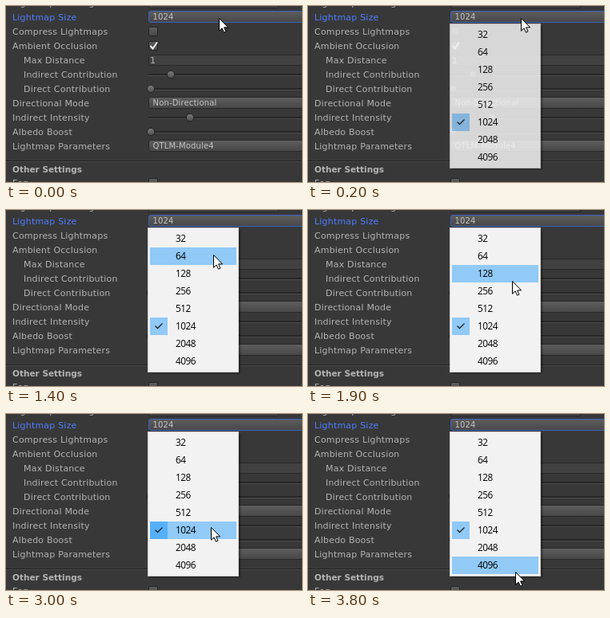
An HTML page for the animation above (4200 ms loop, 370 by 221 pixels).

```html
<!DOCTYPE html>
<html lang="en">
<head>
<meta charset="utf-8">
<title>Lightmap size menu</title>
<style>
html, body { margin: 0; width: 100%; height: 100%; overflow: hidden; background: #383838; }
svg { display: block; width: 370px; height: 221px; }
text { font: 11px "DejaVu Sans", sans-serif; white-space: pre; }
.label { fill: #b4b4b4; letter-spacing: .2px; }
.value { fill: #c4c4c4; font-size: 10px; letter-spacing: .15px; }
.focus { fill: #4c7eff; }
.title { font-size: 10.5px; font-weight: 700; letter-spacing: 0; }
.item { fill: #000; font: 11.8px "Open Sans", sans-serif; letter-spacing: -.5px; }
</style>
</head>
<body>
<svg viewBox="0 0 370 221">
  <defs>
    <linearGradient id="button" x2="0" y2="1">
      <stop stop-color="#5e5e5e"/><stop offset="1" stop-color="#474747"/>
    </linearGradient>
    <linearGradient id="knob" x2="0" y2="1">
      <stop stop-color="#7c7c7c"/><stop offset="1" stop-color="#505050"/>
    </linearGradient>
    <filter id="soft"><feGaussianBlur stdDeviation="1"/></filter>
  </defs>
  <g id="panel"></g>
  <g id="menu">
    <rect x="180" y="25" width="113" height="180" opacity=".4" filter="url(#soft)"/>
    <rect x="177.5" y="22.5" width="113" height="181" fill="#f2f2f2" stroke="#ccc"/>
    <rect id="hover" x="180" width="108" height="22" fill="#91c9f7"/>
    <rect id="tick" x="180" y="135" width="22" height="22"/>
    <path d="M186.5 145.5l3 3 6-6" fill="none" stroke="#222" stroke-width="1.3"/>
    <g id="items"></g>
  </g>
  <path id="cursor" d="M.5.5V16.3L4.1 12.9 6.5 18.2 9 17.1 6.6 11.9H11.6Z" fill="#fff" stroke="#000"/>
</svg>
<script>
const $ = id => document.getElementById(id);
const text = (x, y, s, cls) => `<text x="${x}" y="${y}" class="${cls}">${s}</text>`;

// Each control is drawn around the middle line y of its row
const popup = (y, s, edge = '#282828') =>
  `<rect x="178.5" y="${y - 7.5}" width="210" height="14" rx="2.5" fill="url(#button)" stroke="${edge}"/>`
  + text(183.5, y + 3, s, 'value');

const focused = (y, s) => popup(y, s, '#3d5fc4');

const field = (y, s, width = 210) =>
  `<rect x="178.5" y="${y - 6.5}" width="${width}" height="13" fill="#414141" stroke="#292929"/>`
  + text(180, y + 4, s, 'label');

const checkbox = (y, on) =>
  `<rect x="178.5" y="${y - 5.5}" width="11" height="11" rx="1.5" fill="url(#button)" stroke="#242424"/>`
  + (on ? `<path d="M180.5 ${y}l3 3.5 5.5-8" fill="none" stroke="#eee" stroke-width="2"/>` : '');

const slider = (y, x) =>
  `<path d="M178 ${y}h200" stroke="#272727" stroke-width="2"/>`
  + `<path d="M178 ${y + 1.5}h200" stroke="#4a4a4a"/>`
  + `<circle cx="${x}" cy="${y}" r="4.7" fill="url(#knob)" stroke="#222"/>`;

const rows = [
  ['Lightmap Size', focused, '1024'],
  ['Compress Lightmaps', checkbox, false],
  ['Ambient Occlusion', checkbox, true],
  ['  Max Distance', field, '1'],
  ['  Indirect Contribution', slider, 206],
  ['  Direct Contribution', slider, 181],
  ['Directional Mode', popup, 'Non-Directional'],
  ['Indirect Intensity', slider, 230],
  ['Albedo Boost', slider, 181],
  ['Lightmap Parameters', popup, 'QTLM-Module4']
];

$('panel').innerHTML = text(8, 0, 'Lightmap Padding', 'label') + field(-4, '', 162)
  + rows.map(([name, control, value], i) => {
    const y = 14 + i * 18;
    const x = name.startsWith(' ') ? 22 : 8;
    return text(x, y + 4, name.trim(), control === focused ? 'label focus' : 'label') + control(y, value);
  }).join('')
  + '<path d="M0 194.5h370" stroke="#252525"/><path d="M0 195.5h370" stroke="#484848"/>'
  + text(8, 209, 'Other Settings', 'label title')
  + text(8, 226, 'Fog', 'label') + checkbox(222, false);

$('items').innerHTML = Array.from({ length: 8 }, (_, i) =>
  text(212, 40 + i * 22, 32 << i, 'item')).join('');

// Pointer moves: first and last tick (100 ms each), then where it comes to rest
const moves = [
  [3, 6, 256, 35], [9, 10, 266, 47], [12, 12, 261, 47], [14, 16, 254, 82], [19, 20, 256, 95],
  [23, 26, 250, 119], [28, 30, 256, 142], [33, 35, 257, 161], [37, 38, 259, 198]
];
const smooth = p => p * p * (3 - 2 * p);

function pointer(tick) {
  let x = 266, y = 15;
  for (const [from, to, toX, toY] of moves) {
    if (tick < from) break;
    const p = smooth(Math.min(1, (tick - from + 1) / (to - from + 1)));
    x += (toX - x) * p;
    y += (toY - y) * p;
  }
  return [Math.round(x), Math.round(y)];
}

function draw(now) {
  const tick = Math.floor(now % 4200 / 100);
  const [x, y] = pointer(tick);
  const row = Math.floor((y - 25) / 22);
  $('cursor').setAttribute('transform', `translate(${x} ${y})`);
  $('menu').setAttribute('opacity', Math.min(1, tick * .43));
  $('hover').setAttribute('y', 25 + row * 22);
  $('hover').setAttribute('visibility', row < 0 ? 'hidden' : 'visible');
  $('tick').setAttribute('fill', row === 5 ? '#56b0fa' : '#91c9f7');
}

const start = performance.now();
function loop() {
  draw(performance.now() - start);
  requestAnimationFrame(loop);
}
loop();
</script>
</body>
</html>
```
